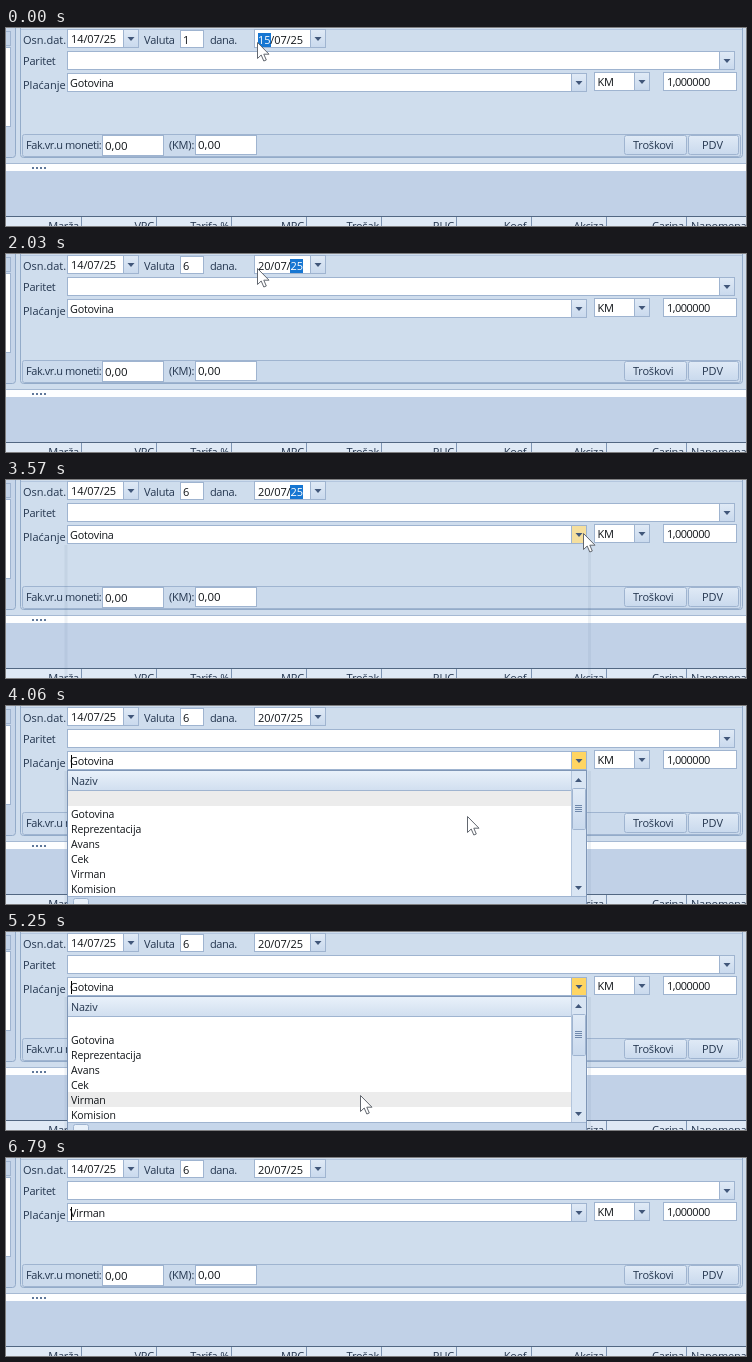
Recreate the animation shown at these times as an HTML page. Size 740x198 px, loop 7.14 s.

```html
<!DOCTYPE html>
<html lang="bs">
<head>
<meta charset="utf-8">
<style>
  html, body { margin: 0; width: 100%; height: 100%; overflow: hidden; background: #cfdded; }
  svg { display: block; }
  text { font: 11px "Open Sans", "Noto Sans", sans-serif; white-space: pre; }
</style>
</head>
<body>
<svg id="stage" width="740" height="198" viewBox="0 0 740 198">
  <defs>
    <linearGradient id="head" x2="0" y2="1">
      <stop stop-color="#e9f1fa"/><stop offset="1" stop-color="#d0deef"/>
    </linearGradient>
    <linearGradient id="button" x2="0" y2="1">
      <stop stop-color="#e0eaf6"/><stop offset="1" stop-color="#c9d9ed"/>
    </linearGradient>
  </defs>
</svg>
<script>
const LOOP = 7140, STEP = 70;
const EDGE = '#9fb4d0', INK = '#101418', LABEL = '#24364f';
const ROWS = ['', 'Gotovina', 'Reprezentacija', 'Avans', 'Cek', 'Virman', 'Komision'];
const ROW_TOP = 85, ROW_HEIGHT = 15;
const stage = document.getElementById('stage');
let layer = stage;

function add(tag, attrs, content = '') {
  const el = document.createElementNS('http://www.w3.org/2000/svg', tag);
  for (const key in attrs) el.setAttribute(key, attrs[key]);
  el.textContent = content;
  return layer.appendChild(el);
}
const fillRect = (x, y, width, height, fill) => add('rect', { x, y, width, height, fill });
const box = (x, y, w, h, fill = '#fff', stroke = EDGE, rx = 0) =>
  add('rect', { x: x + .5, y: y + .5, width: w - 1, height: h - 1, fill, stroke, rx });
const path = (d, fill, stroke = 'none') => add('path', { d, fill, stroke });
const label = (x, y, content, fill = LABEL, size = 11, spacing = -.2, anchor = 'start') =>
  add('text', { x, y, fill, 'text-anchor': anchor,
    style: `font-size:${size}px;letter-spacing:${spacing}px` }, content);
const arrow = (x, y, up = 1) => path(`M${x - 3.5} ${y - 2 * up}h7l-3.5 ${4 * up}z`, '#41577a');

function combo(x, y, w, h = 19) {
  box(x, y, w, h);
  const button = box(x + w - 16, y, 16, h, 'url(#button)');
  arrow(x + w - 8, y + h / 2 + .5);
  return button;
}

function group() {
  layer = stage;
  return layer = add('g', {});
}

// Form panels
fillRect(0, 0, 740, 198, '#cfdded');
box(-6, -6, 16, 136, '#c6d5e9', '#93abc9', 3);
box(-6, 3, 11, 15, '#c3d3e8');
box(-6, 19, 11, 80);
box(14, -6, 723, 136, '#cfdded', '#93abc9', 3);
path('M15 1.5h721', 'none', '#b4c6de');
box(16, 106, 719, 23, '#cbdaec', EDGE, 2);

// Splitter, lower area and grid header
fillRect(0, 136, 740, 7, '#fdfeff');
fillRect(0, 135, 740, 1, '#a5b9d3');
for (let x = 26; x < 41; x += 4) fillRect(x, 139, 2, 2, '#5f7799');
fillRect(0, 143, 740, 46, '#c1d1e7');
fillRect(0, 188, 740, 10, '#dfe9f5');
fillRect(0, 188, 740, 1, '#526782');
const COLUMNS = ['Marža', 'VPC', 'Tarifa %', 'MPC', 'Trošak', 'RUC', 'Koef.', 'Akciza', 'Carina'];
COLUMNS.forEach((name, i) => {
  const right = i < 8 ? 75 + i * 75 : 680;
  fillRect(right, 189, 1, 9, '#7e95b4');
  label(right - 2, 202, name, LABEL, 11, -.2, 'end');
});
label(685, 202, 'Napomena o');

// Labels and fields
label(17, 16, 'Osn.dat.', LABEL, 11, 0);
label(138, 16, 'Valuta');
label(204, 16, 'dana.', LABEL, 11, -.4);
label(17, 37, 'Paritet');
label(17, 61, 'Plaćanje', LABEL, 11, 0);
combo(61, 1, 72);
label(65, 15, '14/07/25', INK, 11, -.1);
box(174, 2, 24, 18);
const days = label(177, 16, '', INK);
combo(248, 1, 72);
// Two digits and a slash repeat every 16.3 px
const partX = i => 252 + (i >> 1) * 16.3 + (i % 2) * 12.3;
const selection = fillRect(0, 5, 13, 14, '#1676d2');
const dateParts = [0, 1, 2, 3, 4].map(i => label(partX(i), 16, '', INK, 11, -.1));
combo(61, 23, 668);
const paymentButton = combo(61, 45, 520);
const payment = label(64, 59, '', INK, 10.8);
const caret = fillRect(65, 49, 1, 13, '#000');
combo(588, 44, 56);
label(591.5, 58, 'KM', INK);
box(657, 44, 74, 19);
label(661, 58, '1,000000', INK, 11, -.5);
label(20, 121, 'Fak.vr.u moneti:', LABEL, 11, -.45);
box(96, 107, 62, 21);
label(99, 122, '0,00', INK, 11.5, 0);
label(163, 121, '(KM):');
box(189, 107, 62, 20);
label(192, 121, '0,00', INK, 11.5, 0);
box(618, 107, 63, 20, 'url(#button)', EDGE, 2);
label(627, 121, 'Troškovi');
box(682, 107, 51, 20, 'url(#button)', EDGE, 2);
label(696, 121, 'PDV', LABEL, 11, 0);

const shadow = add('path', { d: 'M60 65V198M583.5 65V198', stroke: '#5c7596',
  'stroke-width': 3, opacity: .09 });

// Payment list
const list = group();
box(61, 64, 520, 145, '#fff', '#7f96b6');
fillRect(62, 65, 503, 20, 'url(#head)');
fillRect(62, 84, 503, 1, EDGE);
label(65, 79, 'Naziv', LABEL, 10.8);
const hotRow = fillRect(62, 0, 503, ROW_HEIGHT, '#ececec');
ROWS.forEach((name, i) => label(65, ROW_TOP + 12 + i * ROW_HEIGHT, name, INK, 10.5, -.1));
fillRect(565, 65, 15, 125, '#d9e5f3');
fillRect(565, 65, 1, 125, '#b3c5dc');
arrow(572.5, 74, -1);
arrow(572.5, 182);
box(566, 82, 14, 42, 'url(#button)', EDGE, 1);
for (let y = 99; y < 107; y += 2) fillRect(569, y, 7, 1, '#6f88ab');
fillRect(62, 190, 518, 8, '#c6d6ea');
fillRect(62, 190, 518, 1, EDGE);
box(67, 192, 16, 15, '#e9f1fa', EDGE, 2);

group();
const pointer = path('M.5.5V16.5L4.2 13 6.8 19 9.3 18 6.8 12.2H12z', '#fff', '#62676f');

const smooth = p => p * p * (3 - 2 * p), linear = p => p, easeOut = p => 1 - (1 - p) ** 2;
// time, x, y, easing towards this point
const PATH = [
  [2030, 251, 14, linear], [3220, 577, 53, smooth], [3850, 577, 53, linear],
  [4060, 461, 110, linear], [4550, 373, 151, easeOut], [5390, 353, 164, smooth],
  [5880, 353, 164, linear], [6300, 340, 202, smooth],
];

function pointerAt(t) {
  const next = PATH.findIndex(point => point[0] > t);
  if (next === 0) return PATH[0].slice(1, 3);
  if (next < 0) return PATH.at(-1).slice(1, 3);
  const [t0, x0, y0] = PATH[next - 1], [t1, x1, y1, ease] = PATH[next];
  const p = ease((t - t0) / (t1 - t0));
  return [x0 + (x1 - x0) * p, y0 + (y1 - y0) * p];
}

const show = (el, visible) => el.setAttribute('visibility', visible ? 'visible' : 'hidden');

function draw(time) {
  const t = Math.floor(time % LOOP / STEP) * STEP;
  const [x, y] = pointerAt(t);
  const open = t >= 3640 && t < 5530, editing = t >= 3640;

  const day = t < 210 ? '15' : t < 350 ? '02' : '20';
  const selected = editing ? -1 : t < 350 ? 0 : t < 1050 ? 2 : 4;
  [day, '/', '07', '/', '25'].forEach((part, i) => {
    dateParts[i].textContent = part;
    dateParts[i].setAttribute('fill', i === selected ? '#fff' : INK);
  });
  show(selection, selected >= 0);
  selection.setAttribute('x', Math.floor(partX(Math.max(selected, 0))));
  days.textContent = t < 350 ? '1' : '6';

  payment.textContent = t < 5530 ? 'Gotovina' : 'Virman';
  show(caret, editing);
  const hover = t < 3640 && x > 564;
  paymentButton.setAttribute('fill', open ? '#ffd562' : hover ? '#f5df9e' : 'url(#button)');

  show(shadow, t >= 3570 && t < 5530);
  show(list, open);
  // The row highlight trails the pointer by one step
  const under = Math.floor((pointerAt(t - STEP)[1] - ROW_TOP) / ROW_HEIGHT);
  hotRow.setAttribute('y', ROW_TOP + (under < 0 ? 1 : under) * ROW_HEIGHT);
  pointer.setAttribute('transform', `translate(${Math.round(x)} ${Math.round(y)})`);
}

const start = performance.now();
function tick() {
  draw(performance.now() - start);
  requestAnimationFrame(tick);
}
tick();
</script>
</body>
</html>
```
